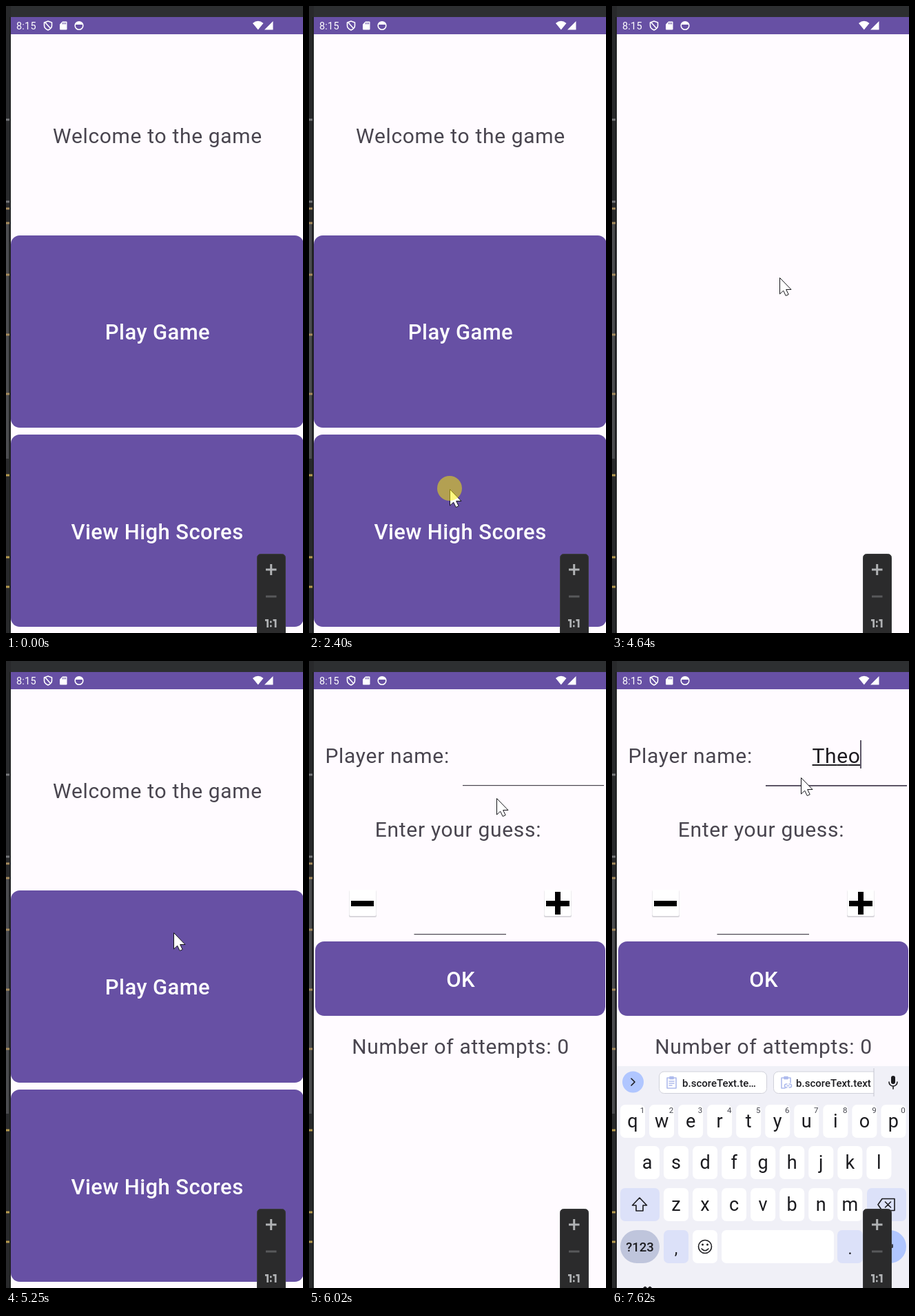
Write an HTML page that moves like this. It is 431 by 910 pixels and loops after 8000 ms.

```html
<!DOCTYPE html>
<html lang="en">
<head>
<meta charset="utf-8">
<title>Guessing game</title>
<style>
html, body { margin: 0; width: 100%; height: 100%; overflow: hidden; background: #fffbff; }
svg { position: absolute; left: 0; top: 0; display: block; }
text, .name { font-family: Roboto, sans-serif; }
.body { font-size: 30px; letter-spacing: .68px; fill: #49454f; }
.button { font-size: 31px; font-weight: 500; letter-spacing: .4px; fill: #fff; }
.mid { text-anchor: middle; }
.purple { fill: #6750a4; }
.line { fill: none; stroke-width: 1.6; stroke-linejoin: round; stroke-linecap: round; }
.key { fill: #fff; }
.soft { fill: #dce1f9; }
.ink { fill: #1b1b1f; }

/* Hard cuts hold each value until the next key */
.cut { animation: 8s step-end infinite; }
#home { animation-name: home; }
#scores { animation-name: scores; }
#game { animation-name: game; }
#focus, .caret { animation-name: focus; }
#click { animation-name: click; }
#keyboard { animation: keyboard 8s linear infinite; }
#pointer { animation: move 8s linear infinite; }

@keyframes home {
  0%, 58.8% { visibility: visible; }
  33.5%, 66.5% { visibility: hidden; }
}
@keyframes scores {
  0%, 48.75% { visibility: hidden; }
  33.5% { visibility: visible; }
}
@keyframes game {
  0% { visibility: hidden; }
  66.5% { visibility: visible; }
}
@keyframes focus {
  0% { visibility: hidden; }
  82.2% { visibility: visible; }
}
@keyframes click {
  0%, 31.6%, 64.7%, 83% { visibility: hidden; }
  29.9%, 62.9%, 81.3% { visibility: visible; }
}
@keyframes keyboard {
  0%, 83.9% { transform: translateY(330px); animation-timing-function: ease-out; }
  86.6%, 100% { transform: none; }
}
@keyframes move {
  0%, 10.8% { transform: translate(385px, 930px); }
  10.87% { transform: translate(385px, 890px); }
  14.4% { transform: translate(340px, 520px); }
  17.4% { transform: translate(282px, 230px); }
  18.3% { transform: translate(278px, 195px); }
  20.4%, 21.2% { transform: translate(266px, 336px); }
  28% { transform: translate(212px, 650px); }
  30%, 31.6% { transform: translate(204px, 701px); }
  34.5% { transform: translate(248px, 440px); }
  37% { transform: translate(255px, 330px); }
  39.5% { transform: translate(238px, 200px); }
  42%, 42.2% { transform: translate(126px, 118px); }
  44.5% { transform: translate(190px, 124px); }
  46% { transform: translate(285px, 118px); }
  48% { transform: translate(337px, 140px); }
  50% { transform: translate(284px, 250px); }
  51.75% { transform: translate(259px, 346px); }
  56%, 66.5% { transform: translate(243px, 394px); }
  72.6% { transform: translate(255px, 255px); }
  75.2%, 75.3% { transform: translate(272px, 199px); }
  78.5% { transform: translate(288px, 21px); }
  81.3%, 100% { transform: translate(274px, 169px); }
}

.name {
  position: absolute; left: 223px; top: 115px; width: 205px; height: 44px;
  line-height: 44px; text-align: center; white-space: nowrap; color: #1d1b20;
  font-size: 30px;
}
.name span {
  letter-spacing: .02em;
  text-decoration: underline 1.5px; text-underline-offset: 2px;
  text-decoration-skip-ink: none;
}
.name i {
  display: inline-block; width: 2px; height: 41px; margin-right: -2px;
  vertical-align: -8px; background: #5c5566;
}
.l1 { animation-name: l1; } .l2 { animation-name: l2; }
.l3 { animation-name: l3; } .l4 { animation-name: l4; }
@keyframes l1 { 0% { font-size: 0; } 87.4% { font-size: 30px; } }
@keyframes l2 { 0% { font-size: 0; } 89.1% { font-size: 30px; } }
@keyframes l3 { 0% { font-size: 0; } 90.9% { font-size: 30px; } }
@keyframes l4 {
  0% { font-size: 0; text-decoration-color: transparent; }
  91.8% { font-size: 30px; text-decoration-color: transparent; }
  95.2% { font-size: 30px; text-decoration-color: #1d1b20; }
}
</style>
</head>
<body>
<svg width="431" height="910" viewBox="0 0 431 910">
  <rect width="431" height="910" fill="#fffbff"/>

  <g id="home" class="cut">
    <text class="body mid" x="220" y="199">Welcome to the game</text>
    <rect class="purple" x="7" y="333" width="425" height="279" rx="13"/>
    <text class="button mid" x="220" y="484">Play Game</text>
    <rect class="purple" x="7" y="622" width="425" height="279" rx="13"/>
    <text class="button mid" x="219.5" y="774">View High Scores</text>
  </g>

  <text id="scores" class="body cut" x="27" y="135">No high scores yet</text>

  <g id="game" class="cut">
    <text class="body" x="23.5" y="148">Player name:</text>
    <rect x="223" y="180" width="205" height="1.2" fill="#49454f"/>
    <text class="body mid" x="216.5" y="255">Enter your guess:</text>
    <g fill="#d9d7dc">
      <rect x="58" y="333" width="40" height="39" rx="2"/>
      <rect x="341" y="333" width="40" height="39" rx="2"/>
    </g>
    <g fill="#fff">
      <rect x="58.5" y="332" width="39" height="38" rx="2"/>
      <rect x="341.5" y="332" width="39" height="38" rx="2"/>
    </g>
    <path d="M61 348h33v8h-33zM344 348h34v8h-34zM357 335h8v33h-8z"/>
    <rect x="152.500" y="396" width="133.500" height="1.2" fill="#49454f"/>
    <rect class="purple" x="9" y="407" width="421" height="108" rx="13"/>
    <text class="button mid" x="220" y="473">OK</text>
    <text class="body mid" x="220" y="570">Number of attempts: 0</text>
  </g>
  <rect id="focus" class="cut" x="223" y="180" width="205" height="2" fill="#5c5566"/>

  <g id="keyboard">
    <rect x="7" y="588" width="424" height="330" fill="#f0f0f7"/>
    <circle cx="30.500" cy="611" r="15.500" fill="#b0c6ff"/>
    <path class="line" stroke="#1b1b1f" stroke-width="2" d="M28 606l5 5-5 5"/>
    <g fill="#fff" stroke="#d0d1da">
      <rect x="68.500" y="596" width="156" height="31.500" rx="7"/>
      <path d="M380 596H241.500a7 7 0 0 0-7 7v17.500a7 7 0 0 0 7 7H380"/>
    </g>
    <path stroke="#c4c5cf" d="M380 591v41"/>
    <g class="line" stroke="#aebbed">
      <path d="M80 605h13v15h-13zM84 603.500h5v3h-5zM83 610h7M83 613h7M83 616h4"/>
      <path d="M251 620h-5v-15h13v7M250 603.500h5v3h-5zM254 614h-1a2.500 2.500 0 0 0 0 5h1M257 614h1a2.500 2.500 0 0 1 0 5h-1M254 616.500h3"/>
    </g>
    <g class="ink" font-size="15" font-weight="500">
      <text x="102" y="617.500">b.scoreText.te…</text>
      <text x="267" y="617.500">b.scoreText.text</text>
    </g>
    <rect class="ink" x="405" y="602" width="6" height="12" rx="3"/>
    <path class="line" stroke="#1b1b1f" d="M402 611a6 6 0 0 0 12 0M408 617v4"/>

    <g id="keys"></g>

    <rect class="soft" x="12" y="765" width="57" height="48" rx="7"/>
    <path class="line" stroke="#1b1b1f" stroke-width="2" d="M40 779l-10.500 11h5.500v8h10v-8h5.500z"/>
    <rect class="soft" x="370" y="765" width="57" height="48" rx="7"/>
    <path class="line" stroke="#1b1b1f" stroke-width="2" d="M386 789l6-8.500h18v17h-18zM396.500 785l8 8M404.500 785l-8 8"/>

    <rect x="12" y="826" width="57" height="48" rx="24" fill="#bfc5dc"/>
    <text class="ink mid" x="40.500" y="857" font-size="18.500" font-weight="500">?123</text>
    <rect class="soft" x="75" y="826" width="36" height="48" rx="7"/>
    <text class="ink mid" x="93" y="861" font-size="23">,</text>
    <rect class="key" x="117" y="826" width="36" height="48" rx="7"/>
    <g class="line" stroke="#1b1b1f">
      <circle cx="135" cy="850" r="9.500"/>
      <path d="M130 853q5 5.500 10 0"/>
    </g>
    <circle class="ink" cx="131.500" cy="847" r="1.500"/>
    <circle class="ink" cx="138.500" cy="847" r="1.500"/>
    <rect class="key" x="159" y="826" width="163" height="48" rx="7"/>
    <rect class="soft" x="327" y="826" width="37" height="48" rx="7"/>
    <text class="ink mid" x="345.500" y="861" font-size="23">.</text>
    <rect x="370" y="826" width="57" height="48" rx="24" fill="#b0c6ff"/>
    <path class="line" stroke="#1b1b1f" d="M407 847v4h-17"/>
    <path class="line" stroke="#1b1b1f" d="M46 910l2-1.500 2 1.500M53 910l2-1.500 2 1.500"/>
  </g>

  <!-- Desktop frame around the phone -->
  <rect width="431" height="16" fill="#2d2f31"/>
  <rect width="7" height="910" fill="#28292b"/>
  <rect y="315" width="4" height="342" fill="#4b4c4f"/>
  <rect x="5" y="16" width="2" height="894" fill="#1f2022"/>
  <g id="marks"></g>

  <rect class="purple" x="7" y="16" width="424" height="25"/>
  <text x="15" y="34" font-size="14.500" fill="#fff" letter-spacing=".2">8:15</text>
  <g class="line" stroke="#fff" stroke-width="1.400">
    <path d="M61 22l5.500 2v4.500q0 4-5.500 6.500q-5.500-2.500-5.500-6.500v-4.500zM57 24l7.500 8.500"/>
    <circle cx="106" cy="28.500" r="5.800"/>
  </g>
  <path fill="#fff" d="M82 22.500h5.500q1 0 1 1v10q0 1-1 1h-8.500q-1 0-1-1v-7z"/>
  <path stroke="#6750a4" d="M82.500 24v2.500M84.500 24v2.500M86.500 24v2.500"/>
  <path fill="#fff" d="M100.500 27a5.800 5.800 0 0 1 11 0zM358 25q7.700-6.500 15.500 0l-7.700 9.500zM375 34.500l12.500-12.500v12.500z"/>

  <rect x="364.500" y="795.500" width="41" height="125" rx="5" fill="#2b2b2c" stroke="#3a3b3d"/>
  <path fill="#b0b2b4" d="M377 816.500h15.500v3h-15.500zM383.200 810h3v16h-3z"/>
  <rect x="377" y="855.500" width="15.500" height="3" fill="#58595b"/>
  <path fill="#b0b2b4" d="M376 890h5v12h-2.700v-9.300h-2.300zM387.500 890h5v12h-2.700v-9.300h-2.300zM383 892.500h2.600v2.700h-2.600zM383 898.500h2.600v2.700h-2.600z"/>

  <g id="pointer">
    <path d="M.5.500v23.500l5.200-4.800 3.500 7.300 4-1.800-3.500-7.200h7.300z" fill="#fff" stroke="#15151a"/>
    <circle id="click" class="cut" cy="-1" r="18" fill="#fff000" fill-opacity=".5"/>
  </g>
</svg>
<div class="name"><span class="cut l1">T</span><span class="cut l2">h</span><span class="cut l3">e</span><span class="cut l4">o</span><i class="cut caret"></i></div>
<script>
const rows = [["qwertyuiop", 30, 644], ["asdfghjkl", 51, 704], ["zxcvbnm", 93, 765]];
const drawKey = (letter, i, x, y, digits) => `
  <rect class="key" x="${x - 18}" y="${y}" width="36" height="48" rx="7"/>
  <text class="ink mid" x="${x}" y="${y + 32.5}" font-size="27">${letter}</text>
  ${digits ? `<text class="mid" x="${x + 14}" y="${y + 12}" font-size="11.5" fill="#45464f">${(i + 1) % 10}</text>` : ""}`;
document.getElementById("keys").innerHTML = rows.map(([letters, x, y], row) =>
  [...letters].map((c, i) => drawKey(c, i, x + i * 42.05, y, row === 0)).join("")).join("");

const marks = [165, 284, 294, 315, 390, 477, 563, 681, 800, 843];
document.getElementById("marks").innerHTML = marks.map((y, i) =>
  `<rect y="${y - 1.5}" width="5" height="3" fill="${i < 2 ? "#77787b" : i < 7 ? "#a58a5c" : "#b59a4e"}"/>`).join("");
</script>
</body>
</html>
```
